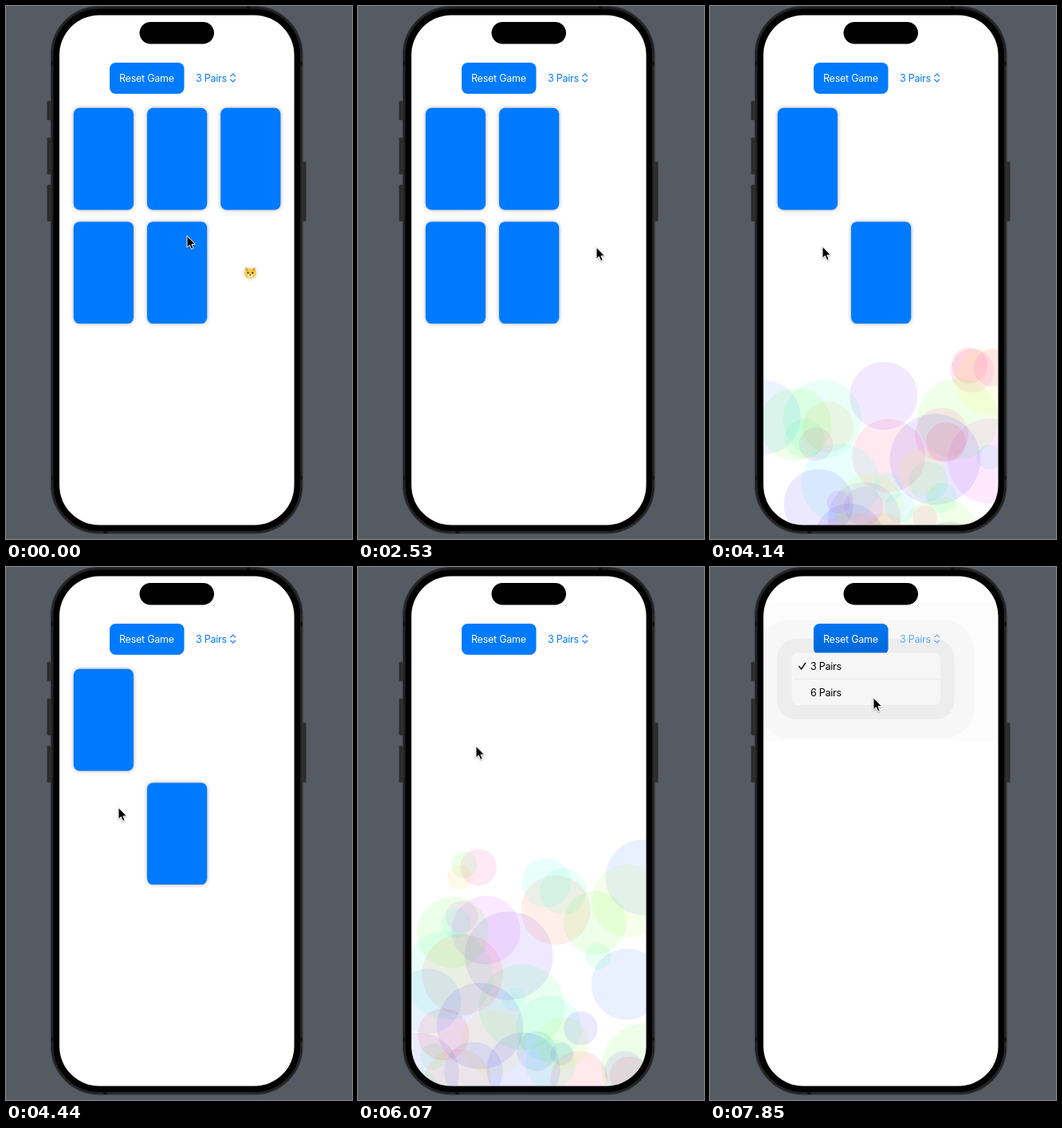
An HTML page that plays this animation: 434x668 px, repeating every 8000 ms.

```html
<!DOCTYPE html>
<html lang="en">
<head>
<meta charset="utf-8">
<title>Memory game</title>
<style>
  html, body { margin: 0; width: 100%; height: 100%; overflow: hidden; background: #555b63; }
  svg { display: block; width: 434px; height: 668px; }
  text { font: 12.5px Inter, "Liberation Sans", sans-serif; letter-spacing: -.25px; }
  .back { fill: #007aff; filter: drop-shadow(0 0 2.5px rgba(0, 0, 0, .33)); }
  .face { filter: drop-shadow(0 0 2.5px rgba(0, 0, 0, .22)); }
  .cursor { filter: drop-shadow(0 1px 1px rgba(0, 0, 0, .3)); }
</style>
</head>
<body>
<svg viewBox="0 0 434 668">
  <defs>
    <clipPath id="screen"><rect x="67" y="11.5" width="294.5" height="639" rx="50"/></clipPath>
    <linearGradient id="shade" x1="0" y1="0" x2="0" y2="1">
      <stop offset="0" stop-color="#0075f2"/><stop offset="1" stop-color="#0067d8"/>
    </linearGradient>
    <g id="cat">
      <path d="M-6.5-1 -6-7.2 -1.5-4.5H1.5L6-7.2 6.5-1Z" fill="#f0b32c"/>
      <ellipse cy="1" rx="7.2" ry="6" fill="#fbc93d"/>
      <path d="M-5-5 -4.7-2 -2.5-4ZM5-5 4.7-2 2.5-4Z" fill="#d98a3a"/>
      <ellipse cy="3.6" rx="3.4" ry="2.3" fill="#fff0c4"/>
    </g>
    <g id="dog">
      <circle r="6.8" fill="#d9a066"/>
      <ellipse cx="-6" cy="-1" rx="2" ry="4.6" fill="#8a5a35"/>
      <ellipse cx="6" cy="-1" rx="2" ry="4.6" fill="#8a5a35"/>
      <ellipse cy="3" rx="3.6" ry="3" fill="#f6e6d0"/>
    </g>
    <g id="fox">
      <path d="M-7-7 -1.5-4.5H1.5L7-7 7 1 0 7.2 -7 1Z" fill="#ee7b2d"/>
      <path d="M-7 1 -1.5 1 0 4 1.5 1 7 1 0 7.2Z" fill="#fff3e6"/>
    </g>
    <g id="features">
      <circle cx="-2.8" cy="0" r="1.1" fill="#3a2a1c"/>
      <circle cx="2.8" cy="0" r="1.1" fill="#3a2a1c"/>
      <ellipse cy="2.7" rx="1.2" ry=".8" fill="#54382c"/>
    </g>
  </defs>

  <rect width="434" height="668" fill="#555b63"/>
  <g fill="#2b2b2c" stroke="#424448" stroke-width=".6">
    <rect x="51.5" y="119" width="5" height="24" rx="1.5"/>
    <rect x="51.5" y="165" width="5" height="46" rx="1.5"/>
    <rect x="51.5" y="224" width="5" height="46" rx="1.5"/>
    <rect x="372" y="195" width="4.5" height="75" rx="1.5"/>
  </g>
  <rect x="56.7" y=".7" width="315" height="660" rx="60" fill="#000" stroke="#303031" stroke-width="1.6"/>
  <rect x="58.5" y="2.5" width="311.4" height="656.4" rx="58" fill="none" stroke="#232324" stroke-width="2"/>
  <path d="M58.4 69v5M58.4 589v5M370 69v5M370 589v5M302 2h5M122 659.4h5" stroke="#111" stroke-width="3"/>
  <rect x="67" y="11.5" width="294.5" height="639" rx="50" fill="#fff"/>

  <g clip-path="url(#screen)">
    <g id="veil">
      <rect x="60" y="45" width="310" height="173" fill="#000" fill-opacity=".012"/>
      <rect x="60" y="66" width="272" height="149" rx="40" fill="#000" fill-opacity=".018"/>
      <rect x="84" y="90" width="222.5" height="101" rx="24" fill="#000" fill-opacity=".04"/>
    </g>
    <rect id="reset" x="130" y="71" width="93.5" height="39" rx="7.5"/>
    <text x="142" y="95" fill="#fff">Reset Game</text>
    <g id="picker">
      <text x="238" y="95" fill="#007aff">3 Pairs</text>
      <path d="M281.7 88.2l3-3 3 3M281.7 92.2l3 3 3-3" fill="none" stroke="#007aff" stroke-width="1.2" stroke-linecap="round" stroke-linejoin="round"/>
    </g>
    <g id="cards"></g>
    <g id="bubbles"></g>
    <g id="menu">
      <rect x="102.5" y="107.5" width="186.5" height="65.5" rx="7.5" fill="#f6f6f6"/>
      <path d="M106 140.3H289" stroke="#dedede" stroke-width=".7"/>
      <path d="M111.8 124.6l2.8 3.4 5-7.6" fill="none" stroke="#000" stroke-width="1.4" stroke-linecap="round" stroke-linejoin="round"/>
      <text x="126" y="128.5">3 Pairs</text>
      <text x="126" y="161.5">6 Pairs</text>
    </g>
  </g>
  <rect x="167.5" y="20" width="93.5" height="27.5" rx="13.75"/>
  <path id="cursor" class="cursor" d="M0 0V14.6L3.3 11.6 5.7 17 8.2 15.9 5.9 10.7 10.4 10.4Z" stroke="#fff" stroke-width="1" stroke-linejoin="round"/>
</svg>
<script>
const LOOP = 8000, TICK = 148;   // the picture advances once per tick
const FLIP_BACK = 3;             // ticks a mismatched pair stays open
const BURST = 2;                 // ticks the confetti lasts
const MENU_OPEN = 48;

const $ = id => document.getElementById(id);
const clamp = v => Math.max(0, Math.min(1, v));
const ease = v => v * v * (3 - 2 * v);

const deck = ['fox', 'dog', 'cat', 'dog', 'fox', 'cat'];
const taps = [[-1, 5], [3, 1], [10, 2], [14, 5], [24, 1], [27, 3], [36, 4], [39, 0]]; // tick, card

// Pointer glides: first tick, last tick, x, y
const origin = [227, 288];
const glides = [
  [0, 3, 225, 214], [6, 9, 298, 195.5], [12, 15, 299, 302.5],
  [18, 23, 225, 214], [25, 27, 141, 301.5], [31, 34, 219, 312],
  [37, 39, 148, 224.5], [42, 47, 262, 88], [50, 53, 205, 164]
];

// Replays the taps: which cards are open or gone, and when the last pair matched.
function play(tick) {
  const gone = new Set();
  let open = [], matched = -Infinity;
  for (const [at, card] of taps) {
    if (at > tick) break;
    open.push(card);
    if (open.length < 2) continue;
    const same = deck[open[0]] === deck[open[1]];
    if (tick < at + (same ? 1 : FLIP_BACK)) break;
    if (same) {
      open.forEach(c => gone.add(c));
      matched = at + 1;
    }
    open = [];
  }
  return { open, gone, matched };
}

function pointer(tick) {
  let [x, y] = origin;
  for (const [start, end, toX, toY] of glides) {
    const k = ease(clamp((tick - start) / (end - start)));
    x += (toX - x) * k;
    y += (toY - y) * k;
  }
  return [x, y];
}

function seeded(seed) {
  return () => {
    seed = (seed + 0x6D2B79F5) | 0;
    let n = Math.imul(seed ^ (seed >>> 15), seed | 1);
    n ^= n + Math.imul(n ^ (n >>> 7), n | 61);
    return ((n ^ (n >>> 14)) >>> 0) / 2 ** 32;
  };
}

function confetti(seed) {
  const rand = seeded(seed);
  return Array.from({ length: 40 }, () => {
    const x = 67 + 295 * rand(), y = 370 + 285 * rand() ** .85;
    const r = 13 + 44 * rand(), hue = 360 * rand();
    return `<circle cx="${x}" cy="${y}" r="${r}" fill="hsl(${hue} 100% 50%)" fill-opacity=".085"/>`;
  }).join('');
}

function card(face, i, { open, gone }) {
  const x = 84.8 + (i % 3) * 92.2, y = 127.8 + Math.floor(i / 3) * 142.6;
  if (gone.has(i)) return '';
  if (!open.includes(i)) return `<rect class="back" x="${x}" y="${y}" width="75.2" height="127.7" rx="7.5"/>`;
  return `<g class="face" transform="translate(${x + 37.2} ${y + 64})">
    <use href="#${face}"/><use href="#features"/></g>`;
}

function draw(tick) {
  const game = play(tick);
  $('cards').innerHTML = deck.map((face, i) => card(face, i, game)).join('');

  const age = tick - game.matched;
  $('bubbles').innerHTML = age < BURST ? confetti(game.matched) : '';
  $('bubbles').setAttribute('transform', `translate(0 ${60 * clamp(1 - age)})`);

  $('cursor').setAttribute('transform', `translate(${pointer(tick)})`);

  const shown = clamp((tick - MENU_OPEN) / 2);
  $('menu').setAttribute('opacity', shown);
  $('menu').setAttribute('transform', `translate(263 107) scale(${shown}) translate(-263 -107)`);
  $('veil').setAttribute('opacity', shown);
  $('reset').setAttribute('fill', shown ? 'url(#shade)' : '#007aff');
  $('picker').setAttribute('opacity', tick >= MENU_OPEN ? .6 : 1);
}

let last = -1;
function run() {
  const tick = Math.floor((performance.now() % LOOP + 5) / TICK);
  if (tick !== last) draw(last = tick);
  requestAnimationFrame(run);
}
run();
</script>
</body>
</html>
```
